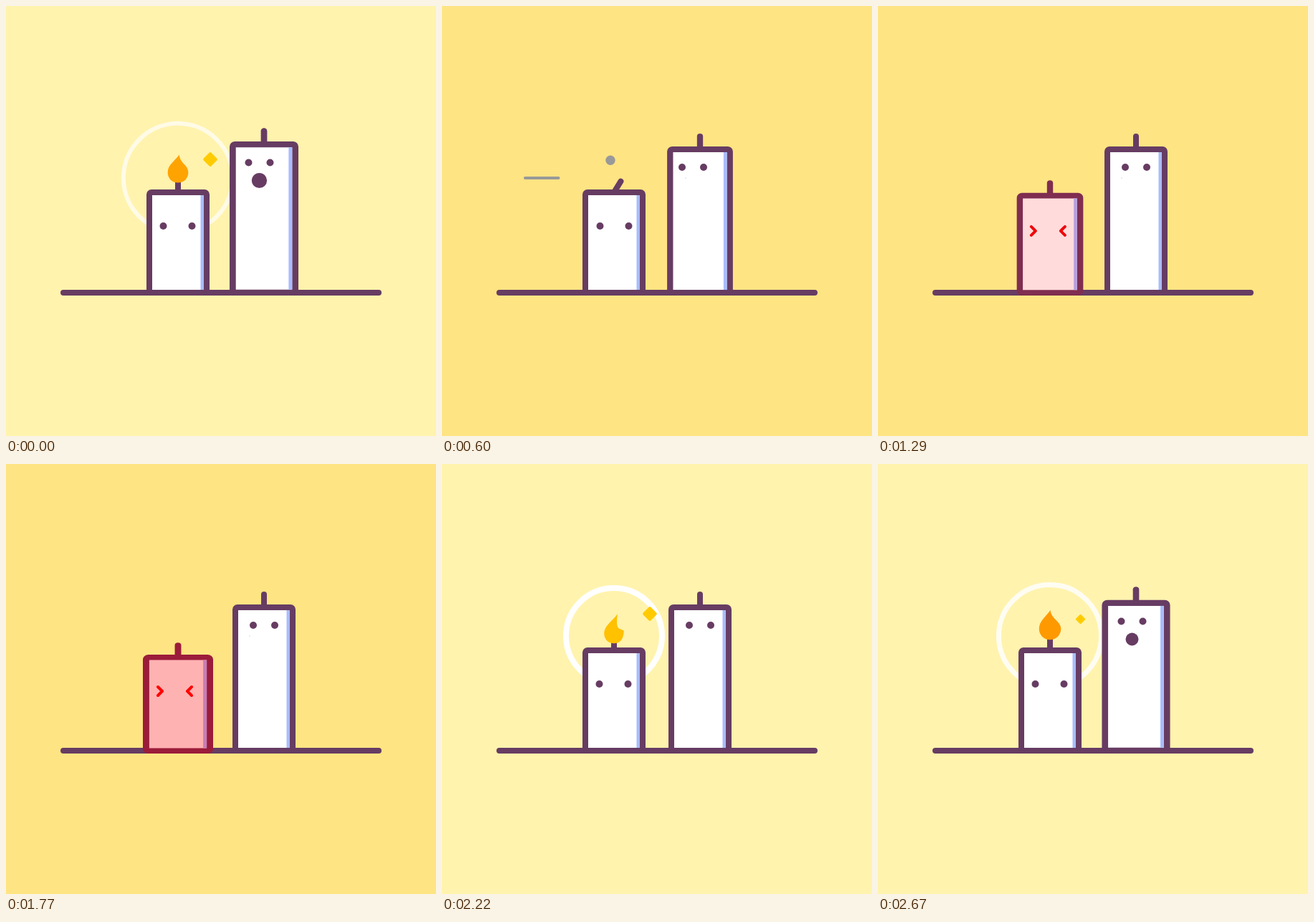
An HTML page for the animation above (2700 ms loop, 600 px wide and 600 px high).

```html
<!DOCTYPE html>
<html lang="en">
<head>
<meta charset="utf-8">
<title>Two candles</title>
<style>
  html, body { margin: 0; width: 100%; height: 100%; overflow: hidden; background: #fff3ae; }
  svg { display: block; width: 100%; height: 100%; }
  .line { fill: none; stroke: #673c63; stroke-width: 8; stroke-linecap: round; }
  .ink { fill: #673c63; }
  .smoke { stroke: #999; stroke-width: 4; stroke-linecap: round; }
  .spark { fill: #ffcb00; }
  .angry { fill: none; stroke-width: 4; stroke-linecap: round; stroke-linejoin: round; }
</style>
</head>
<body>
<svg viewBox="0 0 600 600">
  <rect id="sky" width="600" height="600"/>
  <circle id="ring" cx="240" cy="240" fill="none" stroke="#fff"/>
  <path class="line" d="M80 400H520"/>

  <g id="tall"></g>
  <g id="tallEyes" class="ink"><circle cx="345" cy="225" r="5"/><circle cx="375" cy="225" r="5"/></g>
  <circle id="mouth" class="ink"/>

  <g id="small"></g>
  <g id="calmEyes" class="ink"><circle cx="219.5" cy="307" r="5"/><circle cx="259.5" cy="307" r="5"/></g>
  <path id="angryEyes" class="angry" d="M216.5 301l6 6l-6 6M263.5 301l-6 6l6 6"/>

  <path id="flame"/>
  <rect id="sparkLeft" class="spark" x="-7.5" y="-7.5" width="15" height="15" rx="2"/>
  <rect id="sparkRight" class="spark" x="-7.5" y="-7.5" width="15" height="15" rx="2"/>
  <path id="streak" class="smoke"/>
  <circle id="puff" fill="#999" cx="235"/>
</svg>
<script>
const STEP = 30, STEPS = 90;
// Story in steps: anger builds, the flame relights, the neighbour inhales and blows it out.
const ANGER = 36, BURST = 59, LIT = 60, INHALE = 83.5, OUT = 108;
const GROUND = 404;

const $ = id => document.getElementById(id);
const set = (el, attrs) => { for (const k in attrs) el.setAttribute(k, attrs[k]); };
const show = (el, on) => set(el, { visibility: on ? 'visible' : 'hidden' });

const mix = (a, b, p) => a + (b - a) * p;
const ramp = (t, from, to) => Math.min(1, Math.max(0, (t - from) / (to - from)));
const easeOut = p => 1 - (1 - p) ** 2;
const blend = (a, b, p) => `rgb(${a.map((v, i) => Math.round(mix(v, b[i], p)))})`;

// Fading swing that starts at 1 and reverses every half period.
const wobble = (age, half, length) =>
  age < 0 || age > length ? 0 : (1 - age / length) * Math.cos(Math.PI * age / half);

const INK = [103, 60, 99], WHITE = [255, 255, 255], SHADE = [169, 188, 255];
const RED_INK = [155, 28, 58], PINK = [255, 178, 178], MAUVE = [199, 127, 181], RED = [255, 0, 0];

function buildCandle(id, cx, top) {
  const height = 400 - top;
  $(id).innerHTML = `
    <path class="line wick" d="M${cx} ${top}v-18"/>
    <rect class="body" x="${cx - 40}" y="${top}" width="80" height="${height}" rx="3" stroke-width="8"/>
    <rect class="shade" x="${cx + 31.5}" y="${top + 4}" width="4.5" height="${height - 8}"/>`;
  const [wick, body, shade] = $(id).children;

  return ({ sx, sy, sway = 0, rage = 0 }) => {
    const ink = blend(INK, RED_INK, rage);
    set($(id), { transform: `translate(${cx} ${GROUND}) scale(${sx} ${sy}) translate(${-cx} ${-GROUND})` });
    set(wick, { style: `stroke:${ink}`, transform: `rotate(${sway} ${cx} ${top})` });
    set(body, { fill: blend(WHITE, PINK, rage), stroke: ink });
    set(shade, { fill: blend(SHADE, MAUVE, rage) });
  };
}

const poseTall = buildCandle('tall', 360, 200);
const poseSmall = buildCandle('small', 240, 260);

function drawTall(t) {
  const breath = ramp(t, INHALE, INHALE + 10);
  const swell = Math.sin(breath * Math.PI / 2);
  const drop = 1 - ramp(t, 102, 107);
  poseTall({
    sx: 1 + .107 * swell * (1 - ramp(t, 104, 114)),
    sy: 1 + .04 * swell * drop
  });

  const faceX = -10 * breath * (1 - ramp(t, 112, 118));
  const faceY = -10 * breath * drop;
  set($('tallEyes'), { transform: `translate(${faceX} ${faceY})` });

  // The blown-out mouth stays behind as a tiny speck until the flame returns.
  const blow = t < LIT ? 1 : ramp(t, 98, OUT);
  set($('mouth'), {
    cx: mix(360 + faceX, 340, blow),
    cy: mix(250 + faceY, 240, blow),
    r: mix(16.3 * breath, .4, blow)
  });
}

function drawSmall(t, squash, sy) {
  const rage = ramp(t, ANGER, ANGER + 15) * (1 - ramp(t, BURST, BURST + 5)) ** 2;
  poseSmall({ sx: 1 + .114 * squash, sy, rage, sway: -38 * wobble(t - OUT, 2, 12) });

  const angry = t < LIT;
  show($('calmEyes'), !angry);
  show($('angryEyes'), angry);
  set($('calmEyes'), { transform: `translate(${t > OUT ? 1 : 0} 0)` });
  set($('angryEyes'), {
    transform: `translate(${-1 - 3.5 * rage} ${10 * Math.sqrt(rage)})`,
    stroke: blend(INK, RED, Math.min(1, rage * 1.9))
  });
}

// A teardrop whose lean, height, width and right-hand notch swing together.
function drawFlame(t, top) {
  const angle = (t - LIT - 2) * Math.PI / 3;
  const swing = Math.cos(angle), lag = Math.sin(angle);
  const lean = 2.75 + 2.25 * swing;
  const tip = -49.5 + 2.5 * swing - 2.5 * lag;
  const w = 14.5 - .75 * swing + .6 * lag;
  const base = -8.2 + 2.5 * swing;
  const side = base - w;
  const notch = Math.max(0, swing) ** 3;
  const size = ramp(t, BURST, BURST + 2) * (1 - ramp(t, OUT - 2, OUT));
  set($('flame'), {
    d: `M${lean} ${tip}
      C${lean + 1.5 - 5 * notch} ${tip + 13 + 12 * notch} ${w - 5 * notch} ${side - 11 + 3 * notch} ${w} ${side - 4 * notch}
      C${w} ${side + 8} ${w * .6} ${base} 0 ${base}
      S${-w} ${side + 8} ${-w} ${side}
      C${-w} ${side - 11} ${lean - 6} ${tip + 9} ${lean} ${tip}Z`,
    fill: `rgb(255,${Math.round(173 + 20 * swing)},0)`,
    transform: `translate(240 ${top}) scale(${size})`
  });
}

function drawSpark(id, lit, time, x, dir) {
  const age = time % 18;
  const size = ramp(age, 0, 3) * (1 - ramp(age, 6, 9));
  show($(id), lit && time >= 0 && size > 0);
  set($(id), { transform: `translate(${x + dir * 2.5 * age} ${221.5 - 2.5 * age}) rotate(45) scale(${size})` });
}

function drawGlow(t, lit) {
  const age = Math.max(0, t - LIT), wave = age % 7;
  show($('ring'), lit);
  set($('ring'), { r: 67 + 4.6 * wave, 'stroke-width': 8 - wave, opacity: 1 - .155 * wave });
  drawSpark('sparkLeft', lit, t - LIT, 187.5, -1);
  drawSpark('sparkRight', lit, t - LIT - 9, 277.5, 1);
}

function drawSmoke(t) {
  const start = OUT - 1;
  const head = mix(200, 100, easeOut(ramp(t, start, start + 5)));
  const tail = mix(200, 100, ramp(t, start, start + 8));
  show($('streak'), tail > head);
  set($('streak'), { d: `M${head} 240H${tail}` });

  const rise = ramp(t, start, start + 14);
  show($('puff'), rise > 0);
  set($('puff'), { cy: mix(227, 172, rise), r: 7 * (1 - rise ** 2) });
}

function draw(now) {
  const step = Math.floor(now / STEP) % STEPS;
  const t = step <= ANGER ? step + STEPS : step;
  const lit = t >= LIT && t < OUT;
  const squash = t < BURST ? ramp(t, ANGER, ANGER + 15) : wobble(t - BURST, 4, 13);
  const sy = 1 - .068 * squash;
  const top = GROUND - 148 * sy;
  const dark = t < LIT ? 1 : ramp(t, OUT - 2, OUT);

  set($('sky'), { fill: blend([255, 243, 174], [255, 228, 131], dark) });
  drawGlow(t, lit);
  drawTall(t);
  drawSmall(t, squash, sy);
  show($('flame'), lit);
  drawFlame(t, top);
  drawSmoke(t);
}

const start = performance.now();
function loop() {
  draw(performance.now() - start);
  requestAnimationFrame(loop);
}
loop();
</script>
</body>
</html>
```
